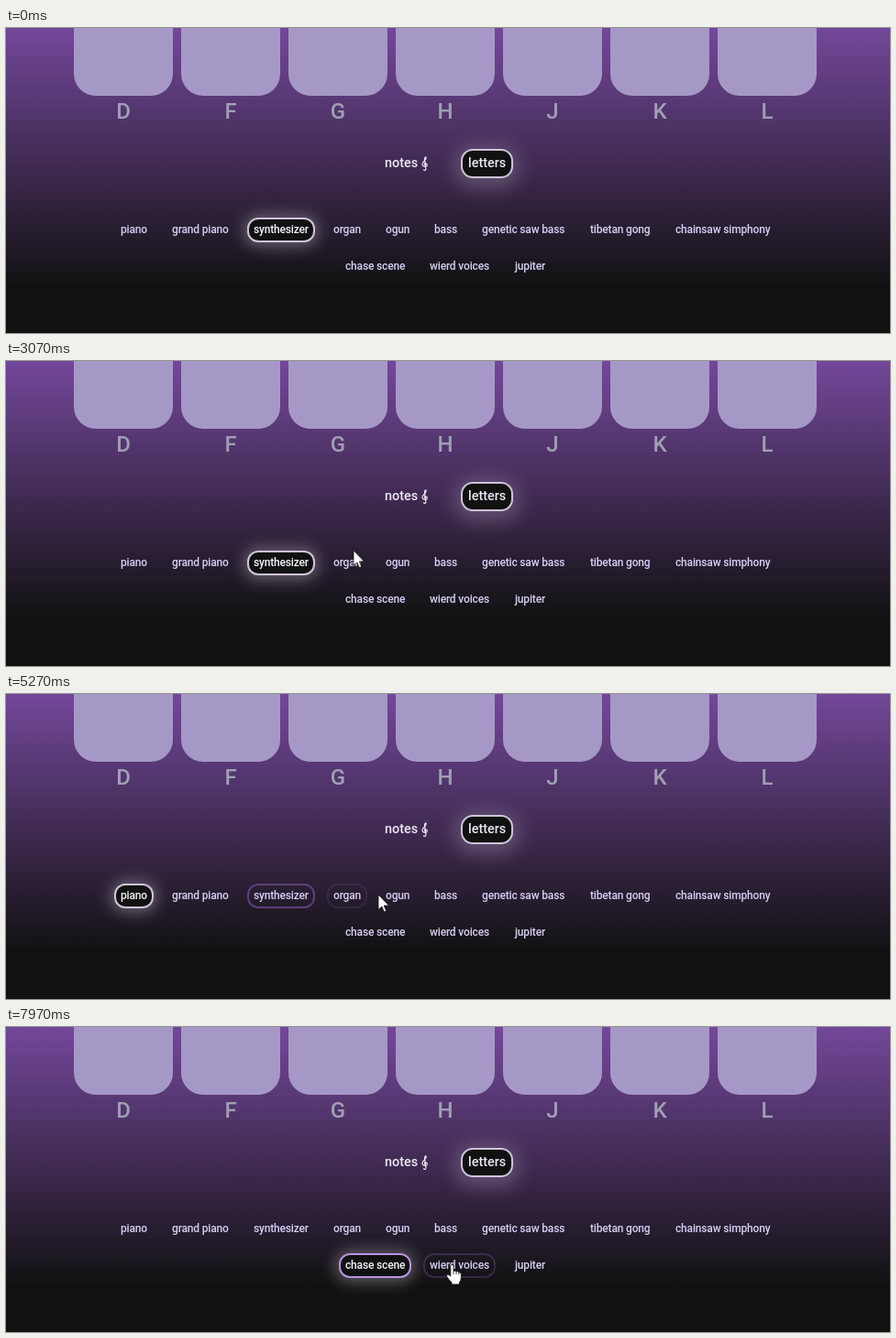
Recreate the animation shown at these times as an HTML page. Size 964 px wide and 333 px high, loop 8 s.

```html
<!DOCTYPE html>
<html lang="en">
<head>
<meta charset="utf-8">
<title>Keyboard sounds</title>
<style>
:root {
  --lit: #cdc4d8;
  --hover: #a870e0;
  --none: rgba(168, 112, 224, 0);
  --half: rgba(168, 112, 224, .5);
  --dark: rgba(17, 17, 17, 0);
  --glow: 0 1px 17px 3px rgba(250, 240, 255, .35);
  --dim: 0 1px 17px 3px rgba(250, 240, 255, 0);
}
html, body { margin: 0; width: 100%; height: 100%; overflow: hidden; }
body {
  position: relative;
  background: #111 linear-gradient(#73479a, #111 283px) no-repeat;
  font: 500 12px/23px Roboto, sans-serif;
  letter-spacing: -.17px;
  color: #d8cef4;
}
.key {
  position: absolute; top: -40px; left: var(--x);
  width: 108px; height: 114px;
  border-radius: 24px; background: #a698c6;
}
.key span {
  position: absolute; top: 117px; width: 100%;
  text-align: center; font-size: 24px; line-height: 28px;
  letter-spacing: 0; color: #a09fb4;
}
.pill {
  position: absolute; left: var(--x); top: 207px;
  padding: 0 5px; border: 2px solid var(--none); border-radius: 12px;
  white-space: nowrap;
}
.low { top: 247px; }
.mode {
  top: 132px; padding: 0 6px; border-radius: 13px;
  font-size: 14.4px; line-height: 28px; letter-spacing: 0; color: #ece8f4;
}
.chosen {
  border-color: var(--lit); background: #111;
  box-shadow: 0 4px 20px 7px rgba(230, 210, 235, .23);
}
.clef { position: absolute; left: 453px; top: 140px; fill: none; stroke: #ece8f4; stroke-width: 1.2; }

.pill, #cursor { animation: 8s linear infinite; }
.synth { animation-name: synth-edge, synth-on; }
.organ { animation-name: organ-edge, organ-on; }
.piano { animation-name: piano-edge, piano-on; }
.bass { animation-name: bass-edge, bass-on; }
.chase { animation-name: chase-edge, chase-on; }
.grand { animation-name: grand-edge; }
.ogun { animation-name: ogun-edge; }
.voices { animation-name: voices-edge; }

@keyframes synth-edge {
  0%, 42.6% { border-color: var(--lit); }
  45%, 49.2% { border-color: var(--none); }
  51% { border-color: var(--half); }
  54%, 62% { border-color: var(--none); }
  63.6% { border-color: rgba(168, 112, 224, .65); }
  65.9% { border-color: rgba(168, 112, 224, .42); }
  69%, 100% { border-color: var(--none); }
}
@keyframes organ-edge {
  0%, 23.5% { border-color: var(--none); }
  26%, 33.5% { border-color: var(--hover); }
  36.5%, 38.4% { border-color: var(--none); }
  41%, 48.7% { border-color: var(--hover); }
  51.5%, 56.4% { border-color: var(--lit); }
  59%, 63.7% { border-color: var(--none); }
  64.5% { border-color: rgba(168, 112, 224, .2); }
  65.9% { border-color: rgba(168, 112, 224, .12); }
  67.5%, 100% { border-color: var(--none); }
}
@keyframes piano-edge {
  0%, 53.9% { border-color: var(--none); }
  56.5%, 59.5% { border-color: var(--hover); }
  63%, 75% { border-color: var(--lit); }
  77.4% { border-color: rgba(205, 196, 216, .13); }
  79%, 100% { border-color: var(--none); }
}
@keyframes bass-edge {
  0%, 71.9% { border-color: var(--none); }
  74.5%, 82.5% { border-color: var(--hover); }
  85.5%, 92.3% { border-color: var(--lit); }
  95%, 100% { border-color: var(--none); }
}
@keyframes chase-edge {
  0%, 85% { border-color: var(--none); }
  88.6%, 98.2% { border-color: var(--hover); }
  100% { border-color: #be9be1; }
}
@keyframes grand-edge {
  0%, 51.1%, 55.5%, 60%, 65%, 100% { border-color: var(--none); }
  52.9%, 61.5% { border-color: var(--half); }
}
@keyframes ogun-edge {
  0%, 66.5%, 73.5%, 100% { border-color: var(--none); }
  69%, 70.4% { border-color: var(--hover); }
}
@keyframes voices-edge {
  0%, 98.6% { border-color: var(--none); }
  100% { border-color: rgba(168, 112, 224, .3); }
}

@keyframes synth-on {
  0%, 42.6% { background-color: #111; box-shadow: var(--glow); color: #f6f2fb; }
  45%, 100% { background-color: var(--dark); box-shadow: var(--dim); color: #d8cef4; }
}
@keyframes organ-on {
  0%, 42.6%, 58%, 100% { background-color: var(--dark); box-shadow: var(--dim); color: #d8cef4; }
  45%, 56% { background-color: #111; box-shadow: var(--glow); color: #f6f2fb; }
}
@keyframes piano-on {
  0%, 56%, 77%, 100% { background-color: var(--dark); box-shadow: var(--dim); color: #d8cef4; }
  58%, 75% { background-color: #111; box-shadow: var(--glow); color: #f6f2fb; }
}
@keyframes bass-on {
  0%, 75%, 94.5%, 100% { background-color: var(--dark); box-shadow: var(--dim); color: #d8cef4; }
  77%, 92.3% { background-color: #111; box-shadow: var(--glow); color: #f6f2fb; }
}
@keyframes chase-on {
  0%, 92.3% { background-color: var(--dark); box-shadow: var(--dim); color: #d8cef4; }
  94.5%, 100% { background-color: #111; box-shadow: var(--glow); color: #f6f2fb; }
}

#cursor {
  position: absolute; left: 0; top: 0; width: 1px; height: 1px;
  overflow: visible; animation-name: move;
}
#cursor path { stroke: #111; stroke-width: .8; }
#shown { animation: show 8s step-end infinite; }
#arrow { animation: arrow 8s step-end infinite; }
#hand { animation: hand 8s step-end infinite; }
@keyframes show { 0%, 12.25% { opacity: 0; } 5.5%, 13.25%, 100% { opacity: 1; } }
@keyframes hand {
  0%, 33.5%, 48.7%, 50.8%, 52.9%, 59.4%, 61.6%, 63.5%, 64.6%, 70.4%, 82.5%, 98.2% { opacity: 0; }
  23.7%, 38.4%, 49.1%, 51.1%, 53.5%, 60%, 62%, 63.7%, 66.5%, 71.9%, 84.5%, 98.6%, 100% { opacity: 1; }
}
@keyframes arrow {
  0%, 33.5%, 48.7%, 50.8%, 52.9%, 59.4%, 61.6%, 63.5%, 64.6%, 70.4%, 82.5%, 98.2% { opacity: 1; }
  23.7%, 38.4%, 49.1%, 51.1%, 53.5%, 60%, 62%, 63.7%, 66.5%, 71.9%, 84.5%, 98.6%, 100% { opacity: 0; }
}
@keyframes move {
  0%, 5.5% { transform: translate(924px, 318px); }
  6.5%, 12.3% { transform: translate(950px, 318px); }
  13.2%, 17.2% { transform: translate(491px, 316px); }
  22%, 22.9% { transform: translate(355px, 234px); }
  26.7%, 27.9% { transform: translate(363px, 226px); }
  29.6%, 31.9% { transform: translate(361px, 219px); }
  33.5% { transform: translate(366px, 202px); }
  35.5% { transform: translate(372px, 176px); }
  36.5% { transform: translate(374px, 178px); }
  38.4% { transform: translate(379px, 207px); }
  39.6% { transform: translate(380px, 227px); }
  41.3%, 48% { transform: translate(380px, 222px); }
  53% { transform: translate(162px, 222px); }
  55%, 59% { transform: translate(140px, 222px); }
  60% { transform: translate(174px, 222px); }
  62% { transform: translate(263px, 222px); }
  63.5% { transform: translate(337px, 222px); }
  64%, 64.3% { transform: translate(391px, 222px); }
  65.8%, 66.2% { transform: translate(406px, 219px); }
  70.4% { transform: translate(447px, 222px); }
  71.9% { transform: translate(462px, 220px); }
  73.3%, 80.5% { transform: translate(477px, 218px); }
  82.5% { transform: translate(466px, 234px); }
  84.5% { transform: translate(436px, 247px); }
  88%, 97% { transform: translate(405px, 262px); }
  99.6%, 100% { transform: translate(486px, 260px); }
}
</style>
</head>
<body>
<div class="key" style="--x:74px"><span>D</span></div>
<div class="key" style="--x:191px"><span>F</span></div>
<div class="key" style="--x:308px"><span>G</span></div>
<div class="key" style="--x:425px"><span>H</span></div>
<div class="key" style="--x:542px"><span>J</span></div>
<div class="key" style="--x:659px"><span>K</span></div>
<div class="key" style="--x:776px"><span>L</span></div>

<div class="pill mode" style="--x:405px">notes</div>
<svg class="clef" width="8" height="17"><path d="M4.3 10.2C3.2 9.6 3 8.2 4.3 7.9 6.3 7.6 7 10 5.4 11 3.4 12 .8 11 1 8.5 1.2 5.8 5.4 4.5 5.2 1.6 5 .2 3.6 1 3.5 3 3.4 5 4.6 10 4.9 13.5 5 15.9 2.6 16 2.4 14.4"/></svg>
<div class="pill mode chosen" style="--x:496px">letters</div>

<div class="pill piano" style="--x:118px">piano</div>
<div class="pill grand" style="--x:174px">grand piano</div>
<div class="pill synth" style="--x:263px">synthesizer</div>
<div class="pill organ" style="--x:350px">organ</div>
<div class="pill ogun" style="--x:407px">ogun</div>
<div class="pill bass" style="--x:460px">bass</div>
<div class="pill" style="--x:512px">genetic saw bass</div>
<div class="pill" style="--x:630px">tibetan gong</div>
<div class="pill" style="--x:723px">chainsaw simphony</div>
<div class="pill low chase" style="--x:363px">chase scene</div>
<div class="pill low voices" style="--x:455px">wierd voices</div>
<div class="pill low" style="--x:548px">jupiter</div>

<svg id="cursor">
  <g id="shown" fill="#fff">
    <path id="arrow" d="M0 0V16.5L3.8 13 6.3 18.8 8.7 17.8 6.2 12H11.5Z"/>
    <g id="hand">
      <path d="M-1.2 .5Q.4-1.6 2 .5V6.6Q3.6 5.6 5 7Q6.6 6.2 7.8 7.8Q9.8 7.4 10.3 9.4V14Q10.2 17 8.4 19V21H0V19Q-3 16-5.2 12.5Q-5.8 10.8-4.5 10.2Q-3 10-1.2 12.2Z"/>
      <path fill="none" d="M2 6.6V10M5 7V10M7.8 7.8V10.4"/>
    </g>
  </g>
</svg>
</body>
</html>
```
